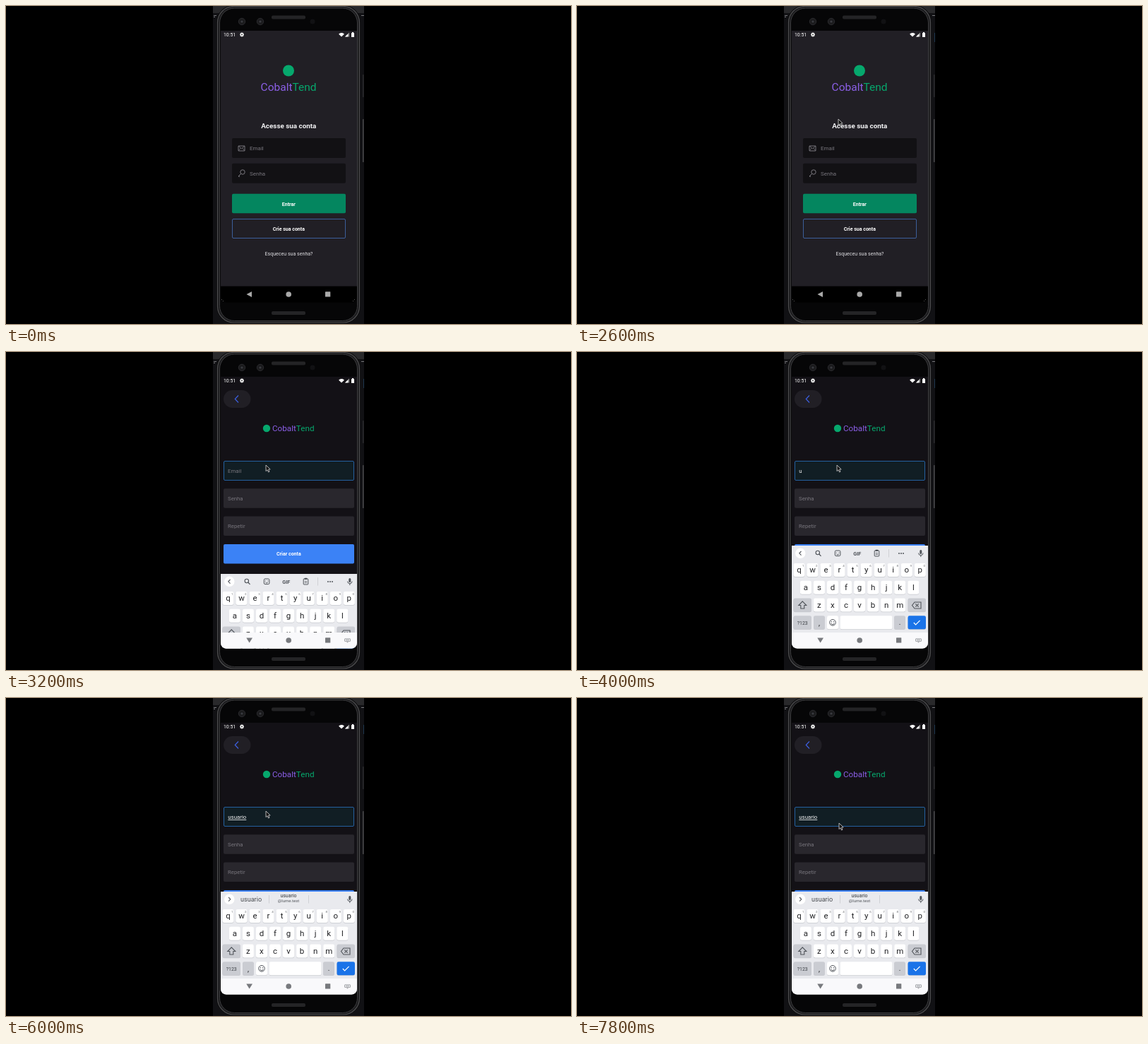
An HTML page with a canvas that plays this animation: 800x450 px, repeating every 8 s.

```html
<!DOCTYPE html>
<html lang="pt-BR">
<head>
<meta charset="utf-8">
<title>Login e cadastro</title>
<style>
html, body { margin: 0; width: 100%; height: 100%; overflow: hidden; background: #000; }
canvas { display: block; width: 800px; height: 450px; }
</style>
</head>
<body>
<canvas id="stage" width="800" height="450"></canvas>
<script>
const ctx = document.getElementById('stage').getContext('2d');
const LOOP = 8000, STEP = 200;
const PURPLE = '#8b5fe6', GREEN = '#06a86d', INK = '#202124', ICON = '#50545a';

// Pointer stops: time, x, y of the tip
const POINTER = [
  [400, 466, 296], [600, 424, 308], [800, 398, 312], [1800, 398, 312],
  [2000, 390, 272], [2200, 377, 202], [2400, 370, 160], [2600, 370, 160],
  [2800, 368, 160], [6400, 368, 160], [7000, 369, 168], [7600, 371, 177]
];

function box(x, y, w, h, r, fill, stroke, lw = 1) {
  ctx.beginPath();
  ctx.roundRect(x, y, w, h, r);
  if (fill) { ctx.fillStyle = fill; ctx.fill(); }
  if (stroke) { ctx.strokeStyle = stroke; ctx.lineWidth = lw; ctx.stroke(); }
}

function disc(x, y, r, fill, stroke, lw = 1) {
  box(x - r, y - r, 2 * r, 2 * r, r, fill, stroke, lw);
}

function poly(points, fill, stroke, lw = 1, closed = true) {
  ctx.beginPath();
  points.forEach(([x, y]) => ctx.lineTo(x, y));
  if (closed) ctx.closePath();
  if (fill) { ctx.fillStyle = fill; ctx.fill(); }
  if (stroke) { ctx.strokeStyle = stroke; ctx.lineWidth = lw; ctx.stroke(); }
}

const line = (points, color, lw = 1) => poly(points, null, color, lw, false);

function text(s, x, y, size, color, align = 'left', weight = 400) {
  ctx.font = `${weight} ${size}px Roboto, sans-serif`;
  ctx.textAlign = align;
  ctx.textBaseline = 'alphabetic';
  ctx.fillStyle = color;
  ctx.fillText(s, x, y);
  return ctx.measureText(s).width;
}

function brand(x, y, size) {
  const w = text('Cobalt', x, y, size, PURPLE);
  text('Tend', x + w, y, size, GREEN);
}

function phone(t) {
  ctx.fillStyle = '#000';
  ctx.fillRect(0, 0, 800, 450);
  ctx.fillStyle = '#111114';
  ctx.fillRect(293, 0, 214, 450);
  ctx.fillStyle = '#29292b';
  ctx.fillRect(293, 0, 214, 10);
  ctx.fillStyle = '#77777a';
  ctx.fillRect(294, 13, 4, 1);
  ctx.fillRect(294, 15, 2, 1);
  ctx.fillRect(503, 13, 4, 1);
  if (t >= 200) {
    ctx.fillStyle = '#1f3850';
    ctx.fillRect(506, 38, 1, 13);
  }
  box(505, 97, 1.5, 32, 0.5, '#2c2c2e');
  box(505, 160, 1.5, 61, 0.5, '#4a4a4c');
  box(298, -1, 204, 450, 24, '#0c0c0d');
  box(299.5, 0.5, 201, 447.5, 23, '#1c1c1e', '#4d4d4f', 1.2);
  box(302.5, 3, 195, 442.5, 21, '#060607', '#3c3c3e');
  box(376, 13.5, 48, 5, 2, '#242426');
  box(376, 432, 48, 5, 2, '#242426');
  for (const x of [334, 360]) {
    disc(x, 22, 4.7, '#1b1b1d', '#2b2b2e');
    disc(x, 22, 1.6, '#3a3b40');
  }
  disc(434, 22, 3.5, '#111113');
}

function statusBar() {
  text('10:51', 308, 43, 6.9, '#fff');
  for (let i = 0; i < 4; i++) {
    const a = i * Math.PI / 4, c = 3 * Math.cos(a), s = 3 * Math.sin(a);
    line([[334 - c, 40.5 - s], [334 + c, 40.5 + s]], '#fff', 1.4);
  }
  disc(334, 40.5, 2.3, '#fff');
  disc(334, 40.5, 0.9, '#222');
  ctx.beginPath();
  ctx.moveTo(475, 43.5);
  ctx.arc(475, 43.5, 5.4, -Math.PI * 0.76, -Math.PI * 0.24);
  ctx.fillStyle = '#fff';
  ctx.fill();
  poly([[480, 43.5], [486, 43.5], [486, 37.5]], '#999');
  poly([[480, 43.5], [484, 43.5], [484, 39.5]], '#fff');
  box(489, 38, 4, 6, 0.6, '#fff');
  ctx.fillRect(490, 37, 2, 1);
}

function keyboardGlyph(color) {
  box(479.5, 405.8, 8, 3.6, 0.5, null, color, 0.9);
  line([[481, 407.6], [486, 407.6]], color, 0.9);
  poly([[482, 410.3], [485, 410.3], [483.5, 411.6]], color);
}

function navBar(open, glyph) {
  const color = open ? '#77797d' : '#a9a9a9';
  if (open) poly([[340.3, 404.5], [349, 404.5], [344.6, 411.5]], color);
  else poly([[348, 404], [348, 412], [340.5, 408]], color);
  disc(400.2, 408, 3.8, color);
  box(452, 404.3, 7.3, 7.3, 0.4, color);
  if (glyph) keyboardGlyph(open ? '#94969a' : '#777');
}

function loginField(y, label) {
  box(320, y, 161, 28, 2, '#121114');
  text(label, 345, y + 16.8, 8, '#77757c');
}

function login() {
  ctx.fillStyle = '#211f25';
  ctx.fillRect(304, 35, 193, 361.5);
  disc(400, 91.5, 8, GREEN);
  brand(360.6, 120, 15.5);
  text('Acesse sua conta', 400.3, 173, 9.85, '#f2f2f4', 'center', 700);

  const gray = '#85838a';
  loginField(187, 'Email');
  box(329, 198, 9, 7, 0.5, null, gray, 0.9);
  line([[329, 198], [333.5, 201.8], [338, 198]], gray, 0.8);
  line([[329, 205], [332.3, 201]], gray, 0.7);
  line([[338, 205], [334.7, 201]], gray, 0.7);
  loginField(222.7, 'Senha');
  disc(335, 235, 3.2, null, gray, 0.9);
  line([[332.7, 237.4], [329, 241], [331, 241.3]], gray, 1);

  box(320, 265.8, 161, 27.5, 2, '#04865f');
  text('Entrar', 400.3, 282.5, 7, '#fff', 'center', 700);
  box(320.5, 301.5, 160, 27, 1.5, null, '#456fb8', 0.8);
  text('Crie sua conta', 400.3, 317.5, 7, '#fff', 'center', 700);
  text('Esqueceu sua senha?', 400.5, 352.6, 7.07, '#dedde1', 'center');
}

function register(t) {
  ctx.fillStyle = '#131116';
  ctx.fillRect(304, 35, 193, 361.5);
  box(308, 54, 38.5, 25, 12.5, '#211f25');
  line([[329, 61.5], [324.3, 66.5], [329, 71.5]], '#3c5fe0', 1.2);
  disc(369, 108, 5.2, GREEN);
  brand(377, 112, 11.7);

  const focused = t >= 3200;
  const typed = t < 4000 ? '' : 'usuario'.slice(0, 1 + (t - 4000) / STEP);
  ['Email', 'Senha', 'Repetir'].forEach((label, i) => {
    const y = 154 + i * 39.3;
    if (i === 0 && focused) box(308.5, y + 0.5, 184, 27, 1.5, '#111e24', '#24609f');
    else box(308, y, 185, 27.5, 2, '#29272d');
    if (i || !typed) text(label, 314, y + 16.8, 7.8, '#77757c');
  });
  if (typed) {
    const w = text(typed, 314.3, 171, 7.85, '#f4f4f5');
    if (t > 4000) line([[314.3, 172.5], [314.3 + w, 172.5]], '#f4f4f5', 0.8);
  }
  box(308, 272, 185, 27.5, 2, '#3b82f6');
  text('Criar conta', 400.3, 288.2, 7, '#fff', 'center', 700);
  return typed;
}

function key(x, y, w, fill = '#fff') {
  box(x, y + 0.8, w, 19, 2.4, '#c8cacf');
  box(x, y, w, 19, 2.4, fill);
}

function letters(row, x0, y, pitch) {
  [...row].forEach((ch, i) => {
    const x = x0 + i * pitch;
    key(x - 8, y, 16);
    text(ch, x, y + 13.2, 11.5, INK, 'center');
  });
}

function mic() {
  box(485.3, 280, 3, 6, 1.5, ICON);
  ctx.beginPath();
  ctx.arc(486.8, 284.5, 3.2, 0, Math.PI);
  ctx.strokeStyle = ICON;
  ctx.lineWidth = 1;
  ctx.stroke();
  line([[486.8, 287.5], [486.8, 290]], ICON);
}

function tools() {
  disc(340.8, 284, 2.7, null, ICON, 1.1);
  line([[342.8, 286], [345.5, 288.8]], ICON, 1.2);
  box(365.3, 281, 7.6, 7.6, 1.6, null, ICON);
  line([[367.3, 283.4], [367.3, 284.4]], ICON);
  line([[371, 283.4], [371, 284.4]], ICON);
  line([[367.3, 286], [369, 287], [371, 286]], ICON, 0.9);
  text('GIF', 396.8, 287.5, 7.3, ICON, 'center', 700);
  box(421.2, 281, 6.6, 8, 0.8, null, ICON);
  box(422.7, 279.8, 3.6, 2.2, 0.5, ICON);
  line([[422.8, 284.5], [426.2, 284.5]], ICON, 0.8);
  line([[422.8, 286.5], [426.2, 286.5]], ICON, 0.8);
  line([[441.5, 279], [441.5, 290.5]], '#cfd1d5');
  for (const x of [456, 459, 462]) disc(x, 285, 1, ICON);
}

function suggestions(word) {
  text(word, 347, 288.3, 9.1, '#4b4e53', 'center');
  line([[372.5, 279], [372.5, 290.5]], '#cfd1d5');
  text('usuario', 400, 281.5, 7, '#33363a', 'center');
  text('@lume.test', 400, 289.3, 6, '#55585d', 'center');
  line([[428.5, 279], [428.5, 290.5]], '#cfd1d5');
}

function keyboard(typed, drop) {
  ctx.save();
  ctx.beginPath();
  ctx.roundRect(304, 274, 193, 145.5, [0, 0, 8, 8]);
  ctx.clip();
  ctx.translate(0, drop);
  ctx.fillStyle = '#e9eaee';
  ctx.fillRect(304, 274, 193, 146);

  const hints = typed.length > 1, d = hints ? 1 : -1;
  disc(316.3, 284.8, 7.2, '#fff');
  line([[316.3 - d * 1.2, 282], [316.3 + d * 1.5, 284.8], [316.3 - d * 1.2, 287.6]], ICON, 1.1);
  if (hints) suggestions(typed); else tools();
  mic();

  letters('qwertyuiop', 314.4, 299, 19.05);
  for (let i = 0; i < 10; i++)
    text((i + 1) % 10, 320.3 + i * 19.05, 304.2, 4.4, '#6a6d72', 'center');
  letters('asdfghjkl', 323.9, 323.7, 19.05);
  letters('zxcvbnm', 342.9, 348.5, 19.05);

  const gray = '#caccd2';
  key(306.5, 348.5, 25.5, gray);
  poly([[319.3, 352.8], [324.8, 358.5], [321.8, 358.5], [321.8, 363], [316.8, 363],
    [316.8, 358.5], [313.8, 358.5]], null, ICON, 1.1);
  key(468.5, 348.5, 25.5, gray);
  poly([[478, 354], [487, 354], [487, 363], [478, 363], [474.5, 358.5]], null, ICON, 1.1);
  line([[479.3, 356.3], [483.7, 360.7]], ICON, 1.1);
  line([[483.7, 356.3], [479.3, 360.7]], ICON, 1.1);

  key(306.5, 373.3, 25.5, gray);
  text('?123', 319.2, 385.8, 7, '#3c4045', 'center');
  key(335, 373.3, 16, gray);
  text(',', 343, 387, 10, INK, 'center');
  key(354, 373.3, 16);
  disc(362, 382.8, 4.3, null, ICON, 1);
  disc(360.4, 381.7, 0.7, ICON);
  disc(363.6, 381.7, 0.7, ICON);
  ctx.beginPath();
  ctx.arc(362, 383.3, 2.3, 0.2, Math.PI - 0.2);
  ctx.strokeStyle = ICON;
  ctx.stroke();
  key(372.5, 373.3, 74);
  key(449, 373.3, 16, gray);
  text('.', 457, 386, 10, INK, 'center');
  key(468.5, 373.3, 25.5, '#1a73e8');
  line([[476.8, 383], [479.6, 385.8], [485.6, 379.8]], '#fff', 1.2);
  ctx.restore();

  box(304, 397, 193, 22.5, [0, 0, 8, 8], '#f9f9fb');
}

function pointer(t) {
  if (t < POINTER[0][0]) return;
  let i = POINTER.findIndex(p => p[0] > t);
  if (i < 0) i = POINTER.length;
  const a = POINTER[i - 1], b = POINTER[i] || a;
  const k = b === a ? 0 : (t - a[0]) / (b[0] - a[0]);
  ctx.save();
  ctx.translate(a[1] + (b[1] - a[1]) * k, a[2] + (b[2] - a[2]) * k);
  poly([[0, 0], [0, 8.6], [2, 6.8], [3.6, 10], [5, 9.3], [3.5, 6.2], [6.2, 6]], '#111', '#c4c4c6', 0.9);
  ctx.restore();
}

function draw(t) {
  phone(t);
  const signup = t >= 2800, open = t >= 3200;
  box(304, 396.5, 193, 23, [0, 0, 8, 8], '#000');
  ctx.fillStyle = '#555';
  for (const x of [305, 307, 491, 493]) ctx.fillRect(x, x === 305 || x === 493 ? 415 : 417, 1, 1);
  if (signup) {
    const typed = register(t);
    if (open) keyboard(typed, t < 3400 ? 40 : 0);
  } else login();
  statusBar();
  navBar(open, signup);
  pointer(t);
}

const start = performance.now();
function tick() {
  const t = (performance.now() - start) % LOOP;
  draw(Math.floor(t / STEP) * STEP);
  requestAnimationFrame(tick);
}
tick();
</script>
</body>
</html>
```
